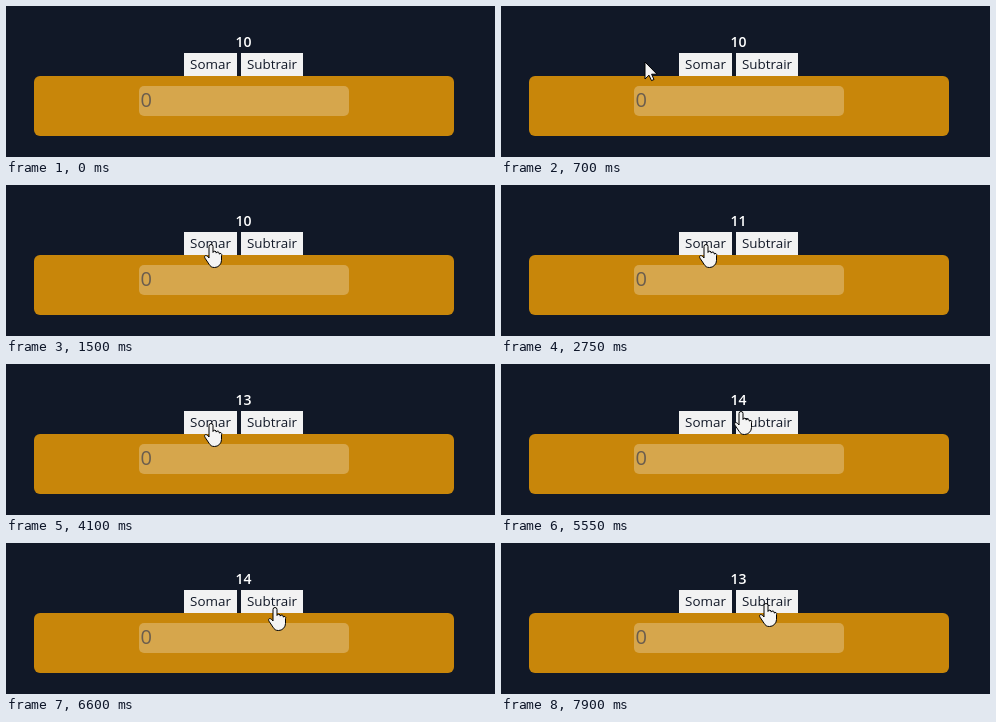
An HTML page that plays this animation: 489x151 px, repeating every 8 s.

```html
<!DOCTYPE html>
<html lang="pt">
<head>
<meta charset="utf-8">
<title>Contador</title>
<style>
  html, body { margin: 0; width: 489px; height: 151px; overflow: hidden; background: #111827; }
  svg { display: block; font-family: "Open Sans", "Noto Sans", sans-serif; }
  .label { font-size: 13.4px; fill: #111827; }
  .cursor { fill: #f4f4f4; stroke: #000; stroke-linejoin: round; }
</style>
</head>
<body>
<svg width="489" height="151" viewBox="0 0 489 151">
  <text id="count" x="237.5" y="41" text-anchor="middle" font-size="14" font-weight="600" fill="#fff">10</text>
  <g fill="#f2f2f2">
    <rect x="178" y="47" width="53" height="23"/>
    <rect x="235" y="47" width="62" height="23"/>
  </g>
  <g class="label" text-anchor="middle">
    <text x="204.5" y="63">Somar</text>
    <text x="266" y="63">Subtrair</text>
  </g>
  <rect x="28" y="70" width="420" height="60" rx="6" fill="#c8860a"/>
  <rect x="133" y="80" width="210" height="30" rx="5" fill="#d6a64c"/>
  <text x="134.5" y="101" font-size="20" fill="#6a5d4e">0</text>
  <path id="arrow" class="cursor" d="M0 0V17L4 13.2L6.5 18.6L9 17.5L6.6 12.2H12Z"/>
  <path id="hand" class="cursor" d="M-2 14V2.5a2 2 0 0 1 4 0V8.5a1.6 1.6 0 0 1 3.2 .6a1.5 1.5 0 0 1 3 1a1.2 1.2 0 0 1 2.3 1.5V16.5a7 7 0 0 1-7 7c-3 0-4-1-5.5-3.3l-4-6c-1.5-2.6 1.3-4.2 4-.2Z"/>
</svg>
<script>
const LOOP = 8000, STEP = 50, ENTER = 250;
const origin = { x: 18, y: 0 };
// Straight strokes of the pointer; it rests between them
const strokes = [
  { start: ENTER, end: 700, x: 144, y: 56 },
  { start: 700, end: 900, x: 236, y: 57 },
  { start: 900, end: 1050, x: 192, y: 58 },
  { start: 1050, end: 1500, x: 205, y: 59 },
  { start: 5250, end: 5550, x: 240, y: 47 },
  { start: 5550, end: 6100, x: 258, y: 60 },
  { start: 6100, end: 6600, x: 269, y: 64 },
  { start: 6600, end: 6850, x: 265, y: 62 },
  { start: 7800, end: 7900, x: 265, y: 60 }
];
const sumClicks = [2750, 3450, 4100, 4950], subtractClicks = [7700];

const el = id => document.getElementById(id);
const count = el("count"), arrow = el("arrow"), hand = el("hand");
const clicksBy = (times, t) => times.filter(at => at <= t).length;

function pointerAt(t) {
  let { x, y } = origin;
  for (const s of strokes) {
    const k = Math.min(1, Math.max(0, (t - s.start) / (s.end - s.start)));
    x += (s.x - x) * k;
    y += (s.y - y) * k;
  }
  return [Math.round(x), Math.round(y)];
}

function place(node, x, y, visible) {
  node.setAttribute("transform", `translate(${x} ${y})`);
  node.style.display = visible ? "" : "none";
}

function draw(now) {
  const t = Math.floor(now % LOOP / STEP) * STEP;
  const [x, y] = pointerAt(t);
  const overButton = y >= 47 && y < 70 && (x >= 178 && x < 231 || x >= 235 && x < 297);
  place(arrow, x, y, t >= ENTER && !overButton);
  place(hand, x, y, t >= ENTER && overButton);
  count.textContent = 10 + clicksBy(sumClicks, t) - clicksBy(subtractClicks, t);
}

function tick() {
  draw(performance.now());
  requestAnimationFrame(tick);
}
tick();
</script>
</body>
</html>
```
